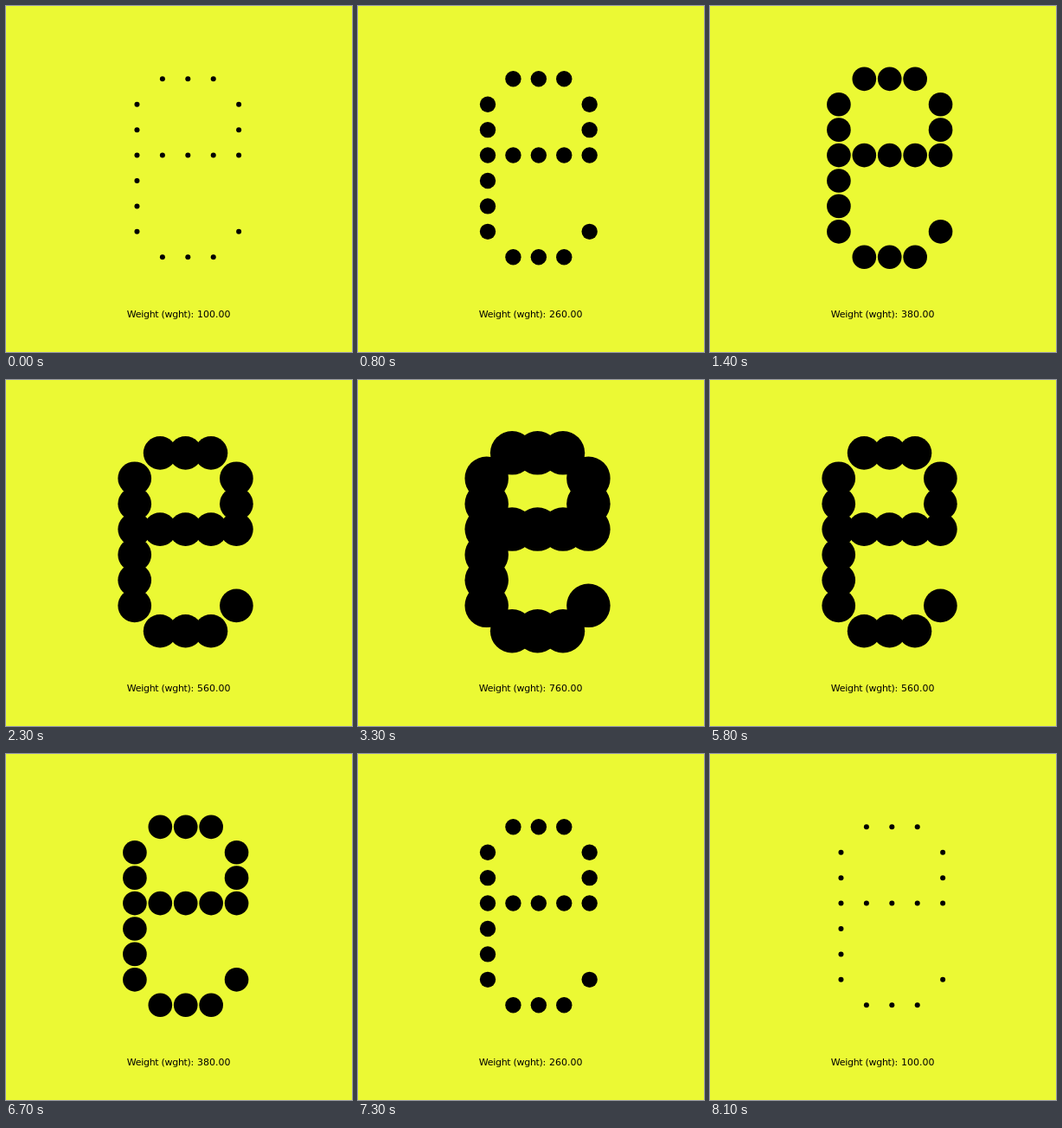
Write an HTML page with a canvas that moves like this. It is 400 by 400 pixels and loops after 8200 ms.

```html
<!DOCTYPE html>
<html lang="en">
<head>
<meta charset="utf-8">
<title>Dot weight</title>
<style>
  html, body { margin: 0; width: 100%; height: 100%; overflow: hidden; background: #ebf934; }
  canvas { display: block; width: 400px; height: 400px; }
</style>
</head>
<body>
<canvas id="stage"></canvas>
<script>
const SIZE = 400, STEP_MS = 100, STEPS = 82;
const PITCH = 29.42, TOP = 84.3;
const GLYPH = [
  ".###.",
  "#...#",
  "#...#",
  "#####",
  "#....",
  "#....",
  "#...#",
  ".###."
];

const canvas = document.getElementById("stage");
const ctx = canvas.getContext("2d");
const ratio = window.devicePixelRatio || 1;
canvas.width = canvas.height = SIZE * ratio;
ctx.scale(ratio, ratio);

const mix = (a, b, t) => a + (b - a) * t;

// Weight climbs 100 to 900, holds one step, then falls back.
function weightAt(step) {
  return step <= 40 ? 100 + step * 20 : 900 - (step - 41) * 20;
}

// Dot radius and glyph centre, with a middle master at weight 400.
function shapeAt(weight) {
  if (weight < 400) {
    const t = (weight - 100) / 300;
    return { radius: mix(3, 14.6, t), centre: mix(210.3, 207.55, t) };
  }
  return { radius: mix(14.6, 29.4, (weight - 400) / 500), centre: 207.55 };
}

function drawText(text, x, align, spacing) {
  ctx.textAlign = align;
  ctx.letterSpacing = spacing;
  ctx.fillText(text, x, 360);
}

function draw(weight) {
  const { radius, centre } = shapeAt(weight);
  ctx.fillStyle = "#ebf934";
  ctx.fillRect(0, 0, SIZE, SIZE);
  ctx.fillStyle = "#000";
  GLYPH.forEach((line, row) => {
    [...line].forEach((cell, col) => {
      if (cell !== "#") return;
      ctx.beginPath();
      ctx.arc(centre + (col - 2) * PITCH, TOP + row * PITCH, radius, 0, Math.PI * 2);
      ctx.fill();
    });
  });
  ctx.font = '11px "DejaVu Sans", sans-serif';
  drawText("Weight (wght):", 139.8, "left", "-0.3px");
  drawText(weight.toFixed(2), 259.4, "right", "0px");
}

function tick() {
  const step = Math.floor(performance.now() / STEP_MS) % STEPS;
  draw(weightAt(step));
  requestAnimationFrame(tick);
}
tick();
</script>
</body>
</html>
```
